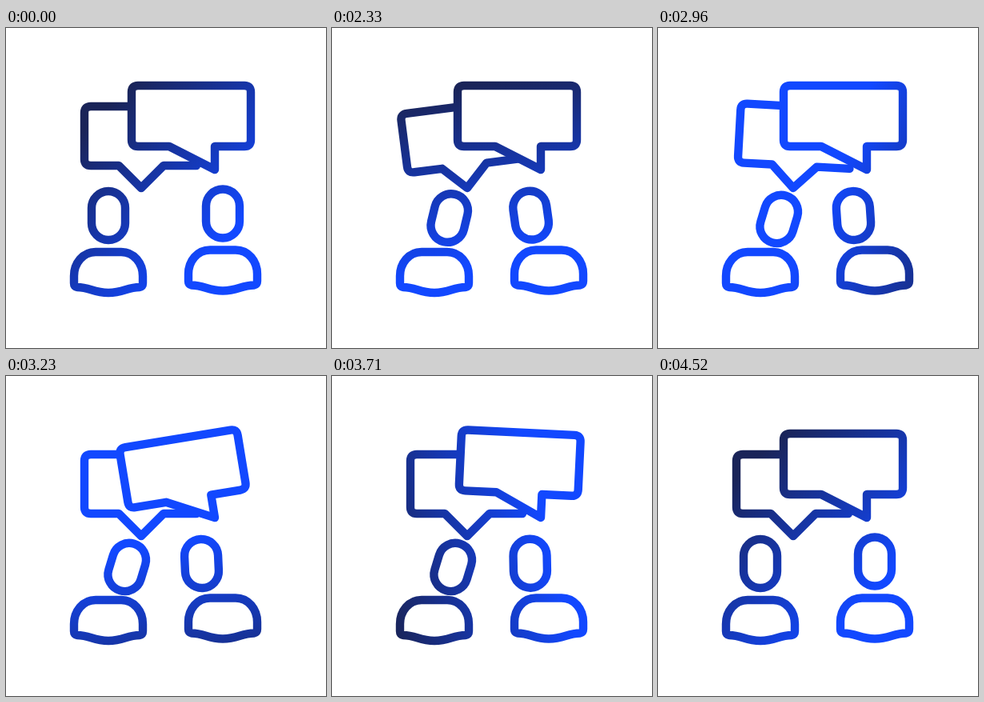
Write an HTML page with a canvas that moves like this. It is 400 px wide and 400 px high and loops after 4.55 s.

```html
<!DOCTYPE html>
<html lang="en">
<head>
<meta charset="utf-8">
<title>Two people talking</title>
<style>
  html, body { margin: 0; width: 100%; height: 100%; overflow: hidden; background: #fff; }
  canvas { display: block; }
</style>
</head>
<body>
<canvas id="stage" width="400" height="400"></canvas>
<script>
const ctx = document.getElementById('stage').getContext('2d');
const LOOP = 4550, STEP = 30, START = 2010;

const backBubble = new Path2D('M200 98H106Q98 98 98 106V164Q98 172 106 172H141L169 200L197 172H238');
const frontBubble = new Path2D('M165 72H298Q306 72 306 80V140Q306 148 298 148H261V177L204 148H165Q157 148 157 140V80Q157 72 165 72Z');
const body = new Path2D('M-16 -51H16C32 -51 43 -37 43 -21V-12Q43 -8 39 -7C23 -7 19 0 0 0S-23 -7 -39 -7Q-43 -8 -43 -12V-21C-43 -37 -32 -51 -16 -51Z');
const head = new Path2D();
head.roundRect(-21, -30.5, 42, 61, 21);

const ramp = (t, from, length) => Math.min(1, Math.max(0, (t - from) / length));
const smooth = x => (1 - Math.cos(Math.PI * x)) / 2;
const pulse = (t, from, length) => Math.sin(Math.PI * ramp(t, from, length));

// A fading swing: straight runs between evenly spaced turning points.
function swing(t, from) {
  const turns = [0, -20, 15, -9, 3.3, 0], beat = 235;
  return turns.slice(1).reduce(
    (angle, next, i) => angle + (next - turns[i]) * ramp(t, from + i * beat, beat), 0);
}

const move = (x, y) => new DOMMatrix().translate(x, y);
const turn = (x, y, angle) => move(x, y).rotate(angle).translate(-x, -y);

function shade(angle) {
  const a = angle * Math.PI / 180, dx = Math.cos(a), dy = Math.sin(a);
  const g = ctx.createLinearGradient(240 + 180 * dx, 240 + 180 * dy, 240 - 40 * dx, 240 - 40 * dy);
  g.addColorStop(0, '#1a2458');
  g.addColorStop(1, '#1248ff');
  return g;
}

// Only the path is transformed, so line weight and gradient stay fixed to the stage.
function outline(shape, matrix, fill) {
  const path = new Path2D();
  path.addPath(shape, matrix);
  if (fill) {
    ctx.fillStyle = fill;
    ctx.fill(path);
  }
  ctx.stroke(path);
}

function draw(t) {
  ctx.fillStyle = '#fff';
  ctx.fillRect(0, 0, 400, 400);
  ctx.lineWidth = 10.4;
  ctx.lineCap = ctx.lineJoin = 'round';
  ctx.strokeStyle = shade(225 + 360 * smooth(ramp(t, START, 2510) ** 0.8));

  outline(backBubble, turn(169, 200, swing(t, START)));
  outline(frontBubble, turn(262, 177, swing(t, START + 1110)), '#fff');

  const leftSquash = 0.06 * pulse(t, START, 300) + 0.05 * pulse(t, 4030, 300);
  const rightSquash = 0.06 * pulse(t, START + 20, 300) + 0.04 * pulse(t, 3870, 280);
  outline(body, move(128, 331).scale(1 + leftSquash, 1 - leftSquash));
  outline(body, move(271, 328.5).scale(1 + rightSquash, 1 - rightSquash));

  // Both heads lean towards each other, hold, and return.
  const leftLean = ramp(t, START, 400) - ramp(t, 3900, 500);
  outline(head, turn(128, 315, 17 * leftLean).translate(128, 234.5 + leftLean + leftSquash * 50));

  const rightLean = ramp(t, START + 20, 355) - ramp(t, 3650, 490);
  const tilt = -15 * rightLean * Math.exp((START - t) / 700);
  outline(head, move(271 - 26.5 * rightLean, 232 + 2.5 * rightLean + rightSquash * 70).rotate(tilt));
}

const start = performance.now();
function frame() {
  const t = (performance.now() - start) % LOOP;
  draw(20 + STEP * Math.floor((t - 20) / STEP));
  requestAnimationFrame(frame);
}
frame();
</script>
</body>
</html>
```
